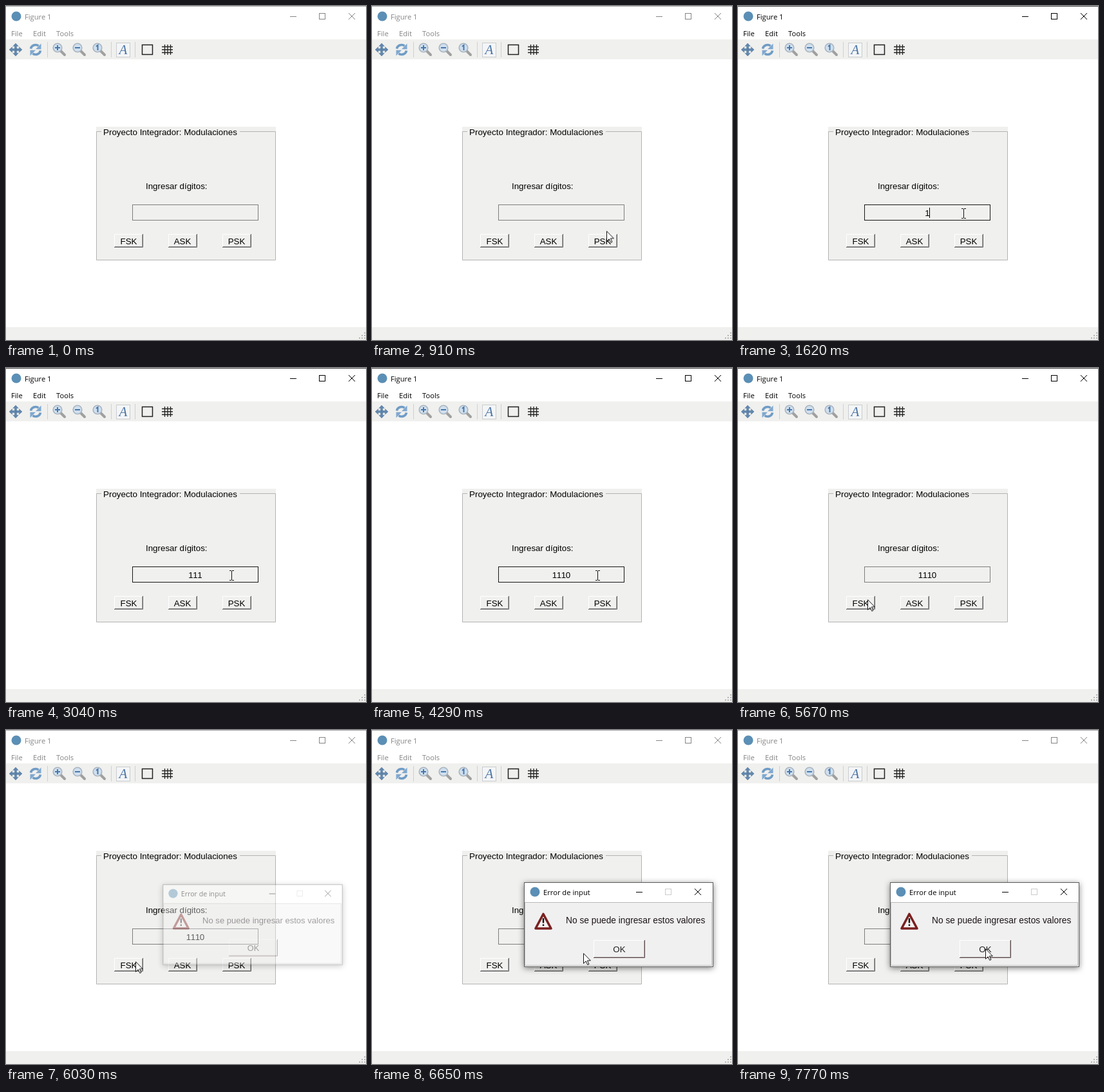
An HTML page for the animation above (8 s loop, 559x520 px).

```html
<!DOCTYPE html>
<html lang="es">
<head>
<meta charset="utf-8">
<title>Figure 1</title>
<style>
html, body { margin: 0; width: 100%; height: 100%; overflow: hidden; background: #fff; }
svg { display: block; }
text { font: 13.333px "Liberation Sans", Arial, sans-serif; }
.ui { font: 11.2px "Open Sans", "Noto Sans", sans-serif; }
.digits { font-kerning: none; letter-spacing: -.4px; }
.mid { text-anchor: middle; }
.line { fill: none; stroke: currentColor; }

.chrome, .digits, .caret, .beam, .arrow, .pressed, .cursor {
  animation: 8s step-end infinite;
}
.digits, .caret, .beam, .pressed, .dialog { opacity: 0; }

/* window focus */
.chrome { color: #858585; fill: currentColor; animation-name: focus; }
@keyframes focus {
  0% { color: #858585; }
  13.25% { color: #000; }
  75.375%, 100% { color: #858585; }
}

/* input field */
.field { stroke: #7d7d7d; animation: hover 8s linear infinite; }
@keyframes hover {
  0%, 12.1% { stroke: #7d7d7d; }
  14.5%, 62.2% { stroke: #171717; }
  63.7%, 69.62% { stroke: #0078d7; }
  69.625%, 100% { stroke: #7d7d7d; }
}

.d1 { animation-name: d1; }
.d2 { animation-name: d2; }
.d3 { animation-name: d3; }
.d4 { animation-name: d4; }
@keyframes d1 { 20.25% { opacity: 1; } 25.25%, 100% { opacity: 0; } }
@keyframes d2 { 25.25% { opacity: 1; } 29.75%, 100% { opacity: 0; } }
@keyframes d3 { 29.75% { opacity: 1; } 45.625%, 100% { opacity: 0; } }
@keyframes d4 { 45.625%, 100% { opacity: 1; } }

.caret { animation-name: blink, advance; }
@keyframes blink {
  13.25%, 20.25%, 44.375%, 60% { opacity: 1; }
  19.625%, 38%, 53.625%, 66.375%, 100% { opacity: 0; }
}
@keyframes advance {
  0% { transform: translate(293px, 314px); }
  20.25% { transform: translate(297px, 314px); }
  25.25% { transform: translate(300px, 314px); }
  29.75% { transform: translate(304px, 314px); }
  45.625%, 100% { transform: translate(307px, 314px); }
}

.pressed { animation-name: press; }
@keyframes press { 69.625% { opacity: 1; } 70.875%, 100% { opacity: 0; } }

/* pointer */
.cursor { animation-name: move; }
@keyframes move {
  0% { transform: translate(440px, 524px); }
  5.75% { transform: translate(440px, 524px); animation-timing-function: steps(6); }
  9.5% { transform: translate(385px, 390px); animation-timing-function: steps(5); }
  12.625% { transform: translate(350px, 323px); }
  60.625% { transform: translate(350px, 323px); animation-timing-function: steps(5); }
  63.75% { transform: translate(244px, 345px); animation-timing-function: steps(8); }
  69% { transform: translate(201px, 360px); }
  80.375% { transform: translate(201px, 360px); animation-timing-function: steps(4); }
  83.125% { transform: translate(328px, 347px); animation-timing-function: steps(9); }
  88.75% { transform: translate(373px, 340px); }
  90% { transform: translate(373px, 340px); animation-timing-function: steps(11); }
  97.125%, 100% { transform: translate(384px, 340px); }
}
.beam { animation-name: beam; }
.arrow { animation-name: arrow; }
@keyframes beam { 12.1% { opacity: 1; } 62.2%, 100% { opacity: 0; } }
@keyframes arrow { 0% { opacity: 1; } 12.1% { opacity: 0; } 62.2%, 100% { opacity: 1; } }

/* error dialog */
.dialog {
  filter: drop-shadow(0 2px 5px rgba(0, 0, 0, .5));
  transform-origin: 383px 303px;
  animation: open 8s linear infinite;
}
@keyframes open {
  0%, 75.37% { opacity: 0; transform: scale(.94); }
  75.375% { opacity: .4; transform: scale(.95); }
  77.25%, 100% { opacity: 1; transform: none; }
}
</style>
</head>
<body>
<svg width="559" height="520" viewBox="0 0 559 520">
  <defs>
    <path id="tip" d="M0-10l4.2 4.6H1.6V0h-3.2v-5.4h-2.6z"/>
    <g id="turn">
      <path d="M-7.5-1.5A7.5 7 0 0 1 4.5-6" fill="none" stroke="#6f9cc6" stroke-width="3.6"/>
      <path d="M8.5-9.5V-.8H0z" fill="#7fa8d0"/>
    </g>
    <g id="lens">
      <path d="M4 4l7 7" stroke="#a0a0a0" stroke-width="4" stroke-linecap="round"/>
      <circle r="6.8" fill="#cfdfee" stroke="#a9b4be" stroke-width="1.6"/>
    </g>
    <g id="button">
      <path d="M0 0h45v21H0z" fill="#f0f0ee"/>
      <path d="M.5 20V.5H44" fill="none" stroke="#fff"/>
      <path d="M1 19.5h42.5V1" fill="none" stroke="#a5a5a5"/>
      <path d="M0 20.5h44.5V0" fill="none" stroke="#5f5f5f"/>
    </g>
    <path id="close" class="line" d="M-5-5L5 5M5-5L-5 5"/>
    <path id="minimize" class="line" d="M-5 .5H5"/>
    <rect id="maximize" class="line" x="-4.5" y="-4.5" width="9" height="9"/>
  </defs>

  <!-- window frame -->
  <path d="M0 0h559v520H0z" fill="#fff"/>
  <path d="M0 52h559v31H0zM0 500h559v20H0z" fill="#f0f0ee"/>
  <circle cx="16" cy="16" r="7.5" fill="#5b8fb5"/>
  <g class="chrome">
    <path class="line" d="M0 .5h559" opacity=".7"/>
    <text class="ui" x="29" y="21">Figure 1</text>
    <text class="ui" x="8" y="47">File</text>
    <text class="ui" x="42" y="47">Edit</text>
    <text class="ui" x="78" y="47">Tools</text>
    <use href="#minimize" x="446" y="16"/>
    <use href="#maximize" x="491" y="16"/>
    <use href="#close" x="537" y="16"/>
  </g>
  <path d="M548 517h10M552 513h6M556 509h2" stroke="#b5b5b5" stroke-width="2" stroke-dasharray="2"/>

  <!-- toolbar -->
  <g transform="translate(15 68)" fill="#6187ae" stroke="#54789d" stroke-width=".5">
    <use href="#tip"/>
    <use href="#tip" transform="rotate(90)"/>
    <use href="#tip" transform="rotate(180)"/>
    <use href="#tip" transform="rotate(270)"/>
  </g>
  <g transform="translate(46 68)">
    <use href="#turn"/>
    <use href="#turn" transform="rotate(180)"/>
  </g>
  <path d="M64.5 56v24M163.5 56v24M200.5 56v24" stroke="#d0d0d0"/>
  <use href="#lens" x="80" y="65"/>
  <use href="#lens" x="111" y="65"/>
  <use href="#lens" x="142" y="65"/>
  <path d="M76 65h8M80 61v8M107 65h8M140 63l2.5-2v8" fill="none" stroke="#4a78aa" stroke-width="2"/>
  <rect x="171.5" y="57.5" width="21" height="22" fill="#f4f5f6" stroke="#c9ccd0"/>
  <text x="182" y="75" class="mid" fill="#4a76a6" style="font:italic 21px 'Liberation Serif',serif">A</text>
  <rect x="211.5" y="60.5" width="16" height="15" fill="none" stroke="#222" stroke-width="1.5"/>
  <path d="M246.5 60v16M251 60v16M255.5 60v16M242 63.5h17M242 68h17M242 72.5h17" stroke="#222" stroke-width="1.3"/>

  <!-- panel -->
  <path d="M140 188h279v208H140z" fill="#f0f0ee"/>
  <path d="M148 195.5h-7.5v200h278v-200H363" fill="none" stroke="#b3b3b3"/>
  <text x="151" y="201" style="font-size:13.42px">Proyecto Integrador: Modulaciones</text>
  <text x="217" y="285">Ingresar dígitos:</text>
  <rect class="field" x="196.5" y="309.5" width="195" height="24" fill="#f0f0ee"/>
  <text class="digits mid d1" x="293.7" y="327">1</text>
  <text class="digits mid d2" x="293.7" y="327">11</text>
  <text class="digits mid d3" x="293.7" y="327">111</text>
  <text class="digits mid d4" x="293.7" y="327">1110</text>
  <rect class="caret" width="1" height="16"/>
  <use href="#button" x="168" y="355"/>
  <use href="#button" x="252" y="355"/>
  <use href="#button" x="336" y="355"/>
  <g class="pressed" fill="none">
    <path d="M168.5 375v-19.5H213" stroke="#5f5f5f"/>
    <path d="M169 375.5h43.5V356" stroke="#fff"/>
  </g>
  <text class="mid" x="190.5" y="371">FSK</text>
  <text class="mid" x="274" y="371">ASK</text>
  <text class="mid" x="358" y="371">PSK</text>

  <!-- error dialog -->
  <g class="dialog">
    <rect x="236.5" y="237.5" width="293" height="131" fill="#fff" stroke="#5c5c5c"/>
    <rect x="237.5" y="268.5" width="290" height="98" fill="#f0f0f0" stroke="#b9b9b9"/>
    <circle cx="253" cy="252" r="7.5" fill="#5b8fb5"/>
    <text class="ui" x="266" y="257">Error de input</text>
    <use href="#minimize" x="415" y="252"/>
    <use href="#maximize" x="460" y="252" color="#ccc"/>
    <use href="#close" x="506" y="252"/>
    <path d="M266 286.5L278 309H254z" fill="#f6f2f2" stroke="#7b2020" stroke-width="3.6" stroke-linejoin="round"/>
    <path d="M266 293v7.5M266 302.5v2.5" stroke="#111" stroke-width="2.4"/>
    <text x="301" y="301" fill="#1c1418" style="font-size:13.75px">No se puede ingresar estos valores</text>
    <path d="M344.5 354v-26.5H423" fill="none" stroke="#fff"/>
    <path d="M345 353.5h77.5V328" fill="none" stroke="#b5abab"/>
    <path d="M344 354.5h79.5V327" fill="none" stroke="#5a4a4a"/>
    <text class="mid" x="384" y="346" fill="#222">OK</text>
  </g>

  <!-- pointer -->
  <g class="cursor">
    <path class="beam" d="M-3-7.5H0M1-7.5H4M-3 7.5H0M1 7.5H4M.5-7V7" fill="none" stroke="#111"/>
    <path class="arrow" d="M.5.8v15.7l3.7-3.6 2.6 5.6 2.2-1-2.6-5.5h5z" fill="#fff" stroke="#111"/>
  </g>
</svg>
</body>
</html>
```
